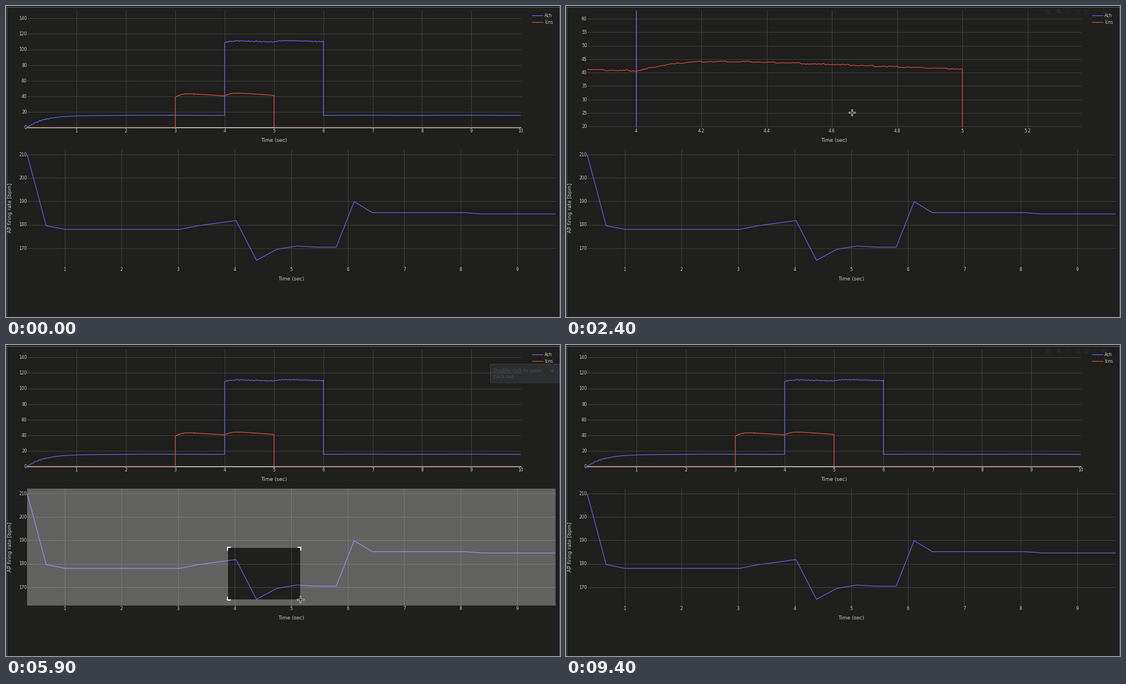
Recreate the animation shown at these times as a matplotlib script. Size 998 by 561 pixels, loop 9800 ms.

```python
import numpy as np
import matplotlib.pyplot as plt
from matplotlib.animation import FuncAnimation
from matplotlib.patches import Circle, PathPatch, Polygon, Rectangle
from matplotlib.path import Path

W, H, DPI = 998, 561, 100
STEP, FRAMES = 100, 98
PT = 72 / DPI
BG, GRID, TEXT = "#1f1f1e", "#444442", "#c8c8c6"
BLUE, RED, PEACH = "#6361e2", "#d24a3c", "#e3b5a6"
ICON, ACTIVE = "#646462", "#b0b0ae"
SANS, LABEL = "DejaVu Sans", "Liberation Sans"

fig = plt.figure(figsize=(9.98, 5.61), dpi=DPI, facecolor=BG)
ax = fig.add_axes([0, 0, 1, 1])
rng = np.random.default_rng(4)


# ---- data

def burst(u, top, fall, dip):
    """Quick rise from top - dip, then a slow linear fall."""
    return top - fall * u - dip * np.exp(-(u / .115) ** 1.2)


def ripple(x, amp):
    return amp * ((x / .075) % 1 - .5) + amp / 4 * rng.normal(size=len(x))


def ach_trace():
    rest = np.arange(.01, 10.005, .01)
    base = 15.7 * (1 - np.exp(-rest / .34)) + .12 * np.sin(3 * rest)
    base += ripple(rest, .1) - np.where(rest < .45, ripple(rest, .9), 0)
    on = np.arange(4, 6.005, .01)
    high = np.where(on < 5, burst(on % 1, 111.7, 1.9, 2.6), burst(on % 1, 112.1, 2, 2.4))
    high[-1] = high[-2]
    before, after = rest < 4.005, rest > 5.995
    return (np.r_[rest[before], on, rest[after]],
            np.r_[base[before], high + ripple(on, .9), base[after]])


def icns_trace():
    x = np.arange(3, 4.9999, .005)
    y = np.where(x < 4, burst(x % 1, 44.7, 4.1, 5.7), burst(x % 1, 45.6, 4.3, 5))
    return np.r_[3, x, 5, 5], np.r_[0, y + ripple(x, .35), 41.3, 0]


def rate_trace():
    """Beat lengths in ms; each beat gives one point of the rate."""
    beat = [0, 1, 2, 8, 9, 11, 12, 13, 14, 16, 17, 18, 28]
    length = [286, 334, 337, 337, 334, 330, 364, 354, 351, 352, 316, 324, 325]
    ms = np.round(np.interp(np.arange(29), beat, length))
    return .05 + np.cumsum(ms) / 1000, 60000 / ms


TOP = dict(area=(38.4, 8.2, 927.3, 219.3), full=(.003, 10, 0, 150),
           zoom=(3.85, 5.363, 19.6, 63.05), zoomed=(2400, 3800), drag=(1800, 2400),
           start=(380.4, 130.7), title=482.5,
           traces=[(ach_trace(), BLUE), (icns_trace(), RED)])
BOTTOM = dict(area=(38.4, 259, 990.5, 469.5), full=(.3365, 9.68, 162.3, 212.1),
              zoom=(3.885, 5.166, 164.9, 186.8), zoomed=(6000, 6400), drag=(5000, 6000),
              start=(400, 366), title=514, traces=[(rate_trace(), BLUE)])

# ---- timing in ms

ENTER, LEAVE, LAST = 600, 9120, 9400
# begin, end, x, y
MOVES = [(600, 1100, 374, 158), (1100, 1500, 380.5, 131), (1700, 2300, 515, 192),
         (2600, 3300, 650, 271), (3300, 4000, 716.5, 204.5), (4000, 4500, 411, 395),
         (4500, 4600, 403.5, 366), (4900, 5900, 530.5, 458.5), (6400, 7000, 592, 177),
         (7000, 7200, 576.5, 175), (7300, 8000, 481.5, 163), (8400, 8700, 482.5, 172.5),
         (9000, 9100, 380, 12)]
# begin, end, x, y, colour, label, name
HOVERS = [(1000, 1300, 373.3, 160.6, RED, "(3.77, 41.71873)", "Icns"),
          (3900, 4200, 716.5, 197, BLUE, "(7.63, 15.83818)", "Ach"),
          (4500, 4800, 414.2, 387, BLUE, "(4.03, 181.81818)", ""),
          (8600, 8900, 481.8, 161.2, RED, "(4.99, 41.28946)", "Icns")]


def during(span, t):
    return span[0] <= t < span[1]


def cursor(t):
    pos = np.array([252, 14.])
    for begin, end, *goal in MOVES:
        u = np.clip((t - begin) / (end - begin), 0, 1)
        pos += (np.array(goal) - pos) * (1 - (1 - u) ** 2)
    return pos


def pointed(p, t):
    over_top = cursor(t)[1] < 245
    return during((ENTER, LEAVE), t) and not during(p["drag"], t) and over_top == (p is TOP)


def bar_alpha(p, t):
    """The toolbar follows the pointer with a 300 ms fade."""
    return np.mean([pointed(p, min(t, LAST) - d) for d in range(0, 301, 25)])


def toast_alpha(t):
    return np.clip(min((t - 2600) / 600, (6000 - t) / 700), 0, 1)


# ---- drawing helpers, all in pixels

def text(x, y, s, size, color=TEXT, ha="left", font=SANS, **kw):
    return ax.text(x, y, s, fontsize=size * PT, color=color, ha=ha,
                   va=kw.pop("va", "baseline"), family=font, **kw)


def line(x, y, color, width=1.28, **kw):
    return ax.plot(x, y, color=color, lw=width * PT, **kw)[0]


def rect(x0, y0, x1, y1, color, **kw):
    return ax.add_patch(Rectangle((x0, y0), x1 - x0, y1 - y0, fc=color,
                                  ec=kw.pop("ec", "none"), **kw))


def poly(points, color, **kw):
    return ax.add_patch(Polygon(points, fc=color, ec=kw.pop("ec", "none"), **kw))


def ticks(lo, hi, count):
    rough = (hi - lo) / count
    base = 10 ** np.floor(np.log10(rough))
    step = base * next(m for m in (2, 5, 10) if rough / base <= m)
    return np.arange(np.ceil(lo / step), np.floor(hi / step + 1e-9) + 1) * step


def draw_plot(p, t):
    x0, y0, x1, y1 = p["area"]
    zoomed = during(p["zoomed"], t)
    xa, xb, ya, yb = p["zoom"] if zoomed else p["full"]

    def px(v):
        return x0 + (np.asarray(v) - xa) / (xb - xa) * (x1 - x0)

    def py(v):
        return y1 - (np.asarray(v) - ya) / (yb - ya) * (y1 - y0)

    for v in ticks(xa, xb, 10.05):
        x = px(v)
        if x0 + 1 < x < x1 - 1:
            line([x, x], [y0, y1], GRID, .9)
        text(x, y1 + 8.5, f"{v:.6g}", 7.7, ha="center")
    for v in ticks(ya, yb, 9.25):
        y = py(v)
        line([x0, x1], [y, y], GRID, .9)
        text(37.7, y + 2.8, f"{v:.6g}", 7.7, ha="right")

    clip = Rectangle((x0, y0), x1 - x0, y1 - y0, transform=ax.transData)
    for (x, y), color in p["traces"]:
        line(px(x), py(y), color, solid_joinstyle="round").set_clip_path(clip)
    if p is TOP and not zoomed:
        line([x0, x1], [y1, y1], "white")
        for a, b in ((xa, 3), (5, xb)):
            line(px([a, b]), [y1, y1], PEACH)
    text(p["title"], y1 + 25.8, "Time (sec)", 8.95, ha="center")


def draw_zoom_box(p, t, cx, cy):
    if not during(p["drag"], t):
        return
    x0, y0, x1, y1 = p["area"]
    a, b = p["start"]
    cx, cy = max(cx, a + 1), max(cy, b + 1)
    outer = [(x0, y0), (x1, y0), (x1, y1), (x0, y1), (x0, y0)]
    inner = [(a, b), (a, cy), (cx, cy), (cx, b), (a, b)]
    codes = [Path.MOVETO] + [Path.LINETO] * 3 + [Path.CLOSEPOLY]
    shade = .3 * min(1, (t - p["drag"][0] + STEP) / 200)
    ax.add_patch(PathPatch(Path(outer + inner, codes * 2), fc="white", ec="none", alpha=shade))
    arm = min(6, (cx - a) / 2 + 1, (cy - b) / 2 + 1)
    for x, sx in ((a - 1, 1), (cx + 1, -1)):
        for y, sy in ((b - 1, 1), (cy + 1, -1)):
            line([x, x, x + sx * arm], [y + sy * arm, y, y], "white", 1.9,
                 solid_joinstyle="miter", solid_capstyle="butt")


def draw_modebar(y, alpha):
    if alpha <= 0:
        return
    o = dict(alpha=alpha)

    def heads(x, turn, r):
        for angle in turn + np.arange(4) * np.pi / 2:
            u = np.array([np.cos(angle), np.sin(angle)])
            side = 1.7 * np.array([-u[1], u[0]])
            tip = np.array([x, y + .2]) + r * u
            poly([tip, tip - 2 * u + side, tip - 2 * u - side], ICON, **o)

    def disc(x, dy, r, color):
        ax.add_patch(Circle((x, y + dy), r, fc=color, ec="none", **o))

    rect(862, y - 5.5, 993.5, y + 4.6, BG, **o)
    # camera
    rect(863, y - 3, 873.5, y + 4.5, ICON, **o)
    rect(866, y - 4.5, 870.5, y - 2.5, ICON, **o)
    disc(868.2, .7, 2.5, BG)
    disc(868.2, .7, 1.4, ICON)
    # magnifier
    ax.add_patch(Circle((886.7, y - .9), 3.2, fc="none", ec=ACTIVE, lw=1.5 * PT, **o))
    line([889, 892], [y + 1.5, y + 4.5], ACTIVE, 2, **o)
    line([885.2, 888.2], [y - .9, y - .9], ACTIVE, 1, **o)
    line([886.7, 886.7], [y - 2.4, y + .6], ACTIVE, 1, **o)
    # pan
    line([898.5, 907.5], [y + .2, y + .2], ICON, 1, **o)
    line([903, 903], [y - 4.3, y + 4.7], ICON, 1, **o)
    heads(903, 0, 5)
    # zoom in / out
    for x in (923, 938):
        rect(x - 4.5, y - 4.3, x + 4.5, y + 4.5, ICON, **o)
        line([x - 2.5, x + 2.5], [y + .2, y + .2], BG, 1.3, **o)
    line([923, 923], [y - 2.3, y + 2.7], BG, 1.3, **o)
    # autoscale
    for s in (1, -1):
        line([949.5, 956.5], [y - 3.5 * s, y + 3.5 * s], ICON, 1.1, **o)
    heads(953, np.pi / 4, 6.4)
    # home
    poly([(963, y + .4), (968, y - 4.5), (973, y + .4)], ICON, **o)
    rect(964.5, y, 971.5, y + 4.4, ICON, **o)
    rect(967.1, y + 1.8, 968.9, y + 4.4, BG, **o)
    rect(983, y - 5, 993, y + 5, "#050505", **o)


def draw_hover(x, y, color, label, name):
    size = 8.3

    def width(s):
        probe = text(0, 0, s, size, font=LABEL)
        w = probe.get_window_extent().width
        probe.remove()
        return w

    left = x + 4.5
    right = left + width(label) + 4.6
    if name:
        rect(right, y - 7.2, right + width(name) + 4.5, y + 7.2, BG)
    poly([(x, y), (left, y - 4), (left, y - 7.2), (right, y - 7.2),
          (right, y + 7.2), (left, y + 7.2), (left, y + 4)], color, ec="#e6e6f0", lw=.8 * PT)
    text(left + 2.3, y + 3, label, size, "white", font=LABEL)
    text(right + 2, y + 3, name, size, color, font=LABEL)


def draw_toast(alpha):
    if alpha <= 0:
        return
    rect(871.8, 33.5, 997.3, 68, "#818ba0", alpha=alpha)
    rect(871.8, 33.5, 997.3, 68, "none", ec="#d5d8e0", lw=.8 * PT, alpha=alpha)
    for y, s in ((48.5, "Double-click to zoom"), (59.5, "back out")):
        text(878.3, y, s, 8.35, "white", alpha=alpha)
    text(984.3, 50.6, "×", 9.5, "white", ha="center", weight="bold", alpha=alpha)


def draw_cursor(x, y):
    for color, wide, r in (("#e0e0e0", 3, 6.3), ("#161616", 1.3, 5.3)):
        line([x - r, x + r], [y, y], color, wide, solid_capstyle="butt")
        line([x, x], [y - r, y + r], color, wide, solid_capstyle="butt")


def draw_frame(i):
    t = i * STEP
    ax.cla()
    ax.set(xlim=(0, W), ylim=(H, 0))
    ax.axis("off")

    line([0, W], [1.5, 1.5], "#4f6873", 1)
    for x in (.5, W - .5):
        line([x, x], [1, H], "#4f6873", 1)
    draw_plot(TOP, t)
    draw_plot(BOTTOM, t)
    text(7.8, 364, "AP firing rate [bpm]", 8.95, ha="center", va="center", rotation=90)
    for y, name, color in ((17, "Ach", BLUE), (29, "Icns", RED)):
        line([948, 967], [y, y], color)
        text(970, y + 2.9, name, 7.7)

    pos = cursor(t)
    for p in (TOP, BOTTOM):
        draw_zoom_box(p, t, *pos)
    for begin, end, *spec in HOVERS:
        if during((begin, end), t):
            draw_hover(*spec)
    draw_modebar(10, bar_alpha(TOP, t))
    draw_modebar(260, bar_alpha(BOTTOM, t))
    draw_toast(toast_alpha(t))
    if during((ENTER, LEAVE), t):
        draw_cursor(*pos)

    # equal zorder keeps the order of drawing
    for artist in (*ax.lines, *ax.patches, *ax.texts):
        artist.set_zorder(1)
    return []


anim = FuncAnimation(fig, draw_frame, frames=FRAMES, interval=STEP, init_func=lambda: [],
                     repeat=True, repeat_delay=0, blit=False)
plt.show()
```
